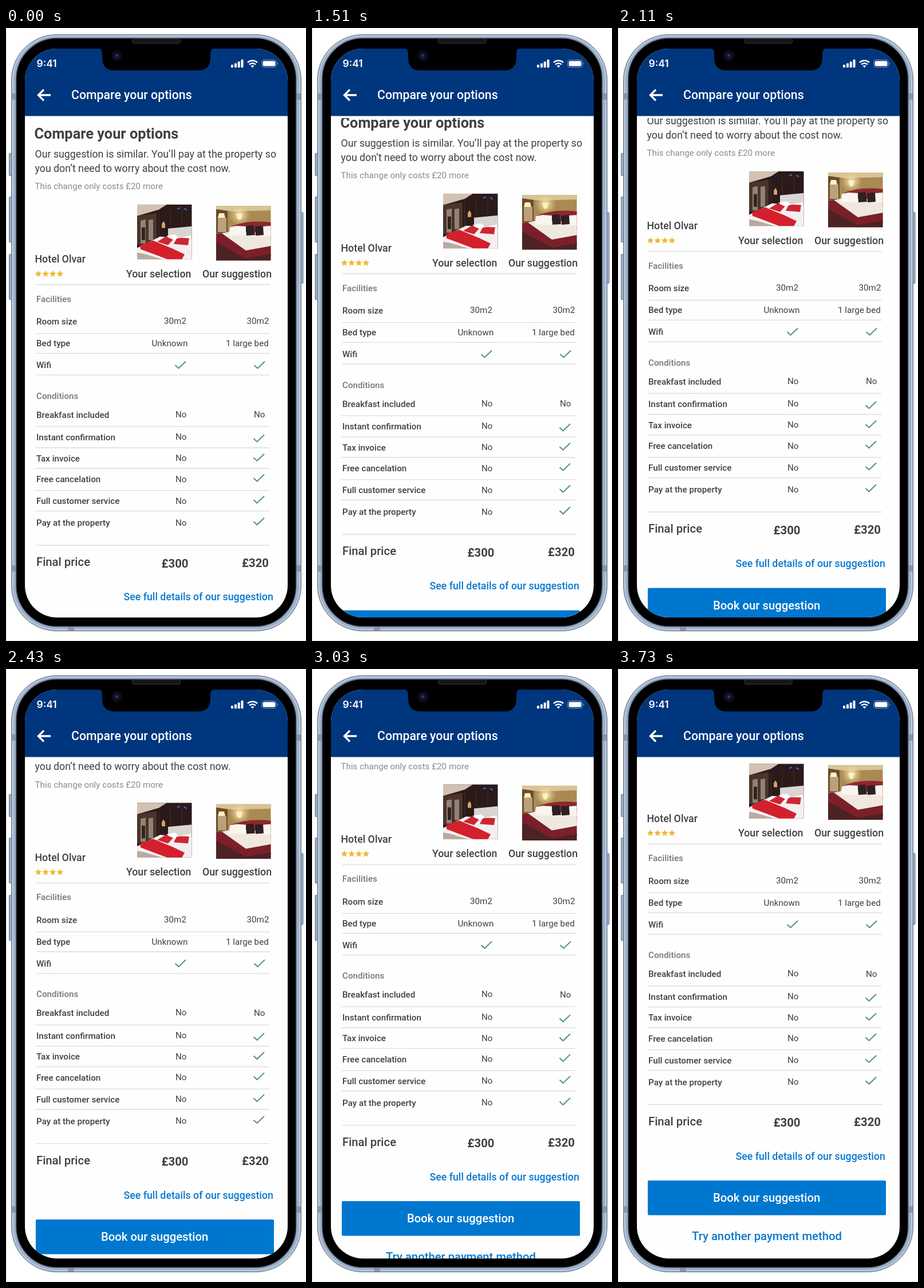
These frames come from a looping animation (524x1069 px, 6.55 s). An HTML page:

```html
<!DOCTYPE html>
<html lang="en">
<head>
<meta charset="utf-8">
<title>Compare your options</title>
<style>
  html, body { margin: 0; width: 100%; height: 100%; overflow: hidden; background: #fff; }
  svg { display: block; font-family: Roboto, sans-serif; }
  .medium { font-weight: 500; }
  .bold { font-weight: 700; }
  .line { stroke: #dcdcdc; stroke-width: 1.3; }
  .check { fill: none; stroke: #529568; stroke-width: 2; }
</style>
</head>
<body>
<svg width="524" height="1069" viewBox="0 0 524 1069">
  <defs>
    <clipPath id="view"><path d="M33 157H492V972a56 56 0 0 1-56 56H89a56 56 0 0 1-56-56Z"/></clipPath>
    <clipPath id="screen"><rect x="33" y="36" width="459" height="992" rx="56"/></clipPath>
    <clipPath id="square"><rect width="95.5" height="95.5"/></clipPath>
    <radialGradient id="glow">
      <stop offset="0" stop-color="#fff6cf"/>
      <stop offset="1" stop-color="#e3c37a" stop-opacity="0"/>
    </radialGradient>
  </defs>

  <path d="M.5 0V1068.5H524" fill="none" stroke="#e6e6e6"/>

  <!-- Phone body -->
  <g fill="#9dafc6" stroke="#66758c">
    <rect x="5.5" y="218.5" width="6" height="39" rx="1.5"/>
    <rect x="5.5" y="294.5" width="6" height="79" rx="1.5"/>
    <rect x="5.5" y="394.5" width="6" height="79" rx="1.5"/>
    <rect x="512.5" y="321.5" width="6.5" height="124" rx="1.5"/>
    <rect x="9.5" y="11.5" width="506" height="1040" rx="79"/>
  </g>
  <rect x="12" y="14" width="501" height="1035" rx="76" fill="none" stroke="#bccbdd" stroke-width="2"/>
  <path d="M9.5 114h9v11h-9zm0 823h9v11h-9zM506 114h9v11h-9zm0 823h9v11h-9zM108 1042h11v9h-11z" fill="#8795a9"/>
  <rect x="18" y="18" width="488.5" height="1025.5" rx="71" stroke="#38435a" stroke-width="1.5"/>
  <rect x="220.5" y="18.5" width="84" height="8" rx="3" fill="#151515" stroke="#3a3a3a"/>

  <g clip-path="url(#screen)">
    <rect x="33" y="36" width="459" height="992" fill="#fefefe"/>
    <rect x="33" y="36" width="459" height="117.5" fill="#00367d"/>
  </g>
  <path d="M160 35q8 1 8 9v8q0 22 22 22H335q22 0 22-22V44q0-8 8-9Z"/>
  <circle cx="193.5" cy="48.5" r="10" fill="#0b0c12"/>
  <circle cx="193.5" cy="48.5" r="5" fill="#131a42"/>
  <circle cx="193.5" cy="48" r="1.7" fill="#34468c"/>

  <!-- Status bar and title -->
  <g fill="#fff">
    <text x="53.5" y="68" font-size="17.5" font-weight="600" font-family="Inter, sans-serif">9:41</text>
    <rect x="393" y="64" width="4" height="5" rx="1"/>
    <rect x="399" y="61.5" width="4" height="7.5" rx="1"/>
    <rect x="404.7" y="58.5" width="4" height="10.5" rx="1"/>
    <rect x="410.5" y="55" width="4" height="14" rx="1"/>
    <path d="M427.5 66l3 3.2 3-3.2q-3-2.2-6 0Z"/>
    <path d="M422 60.2a12.5 12.5 0 0 1 17 0M425 63.7a8 8 0 0 1 11 0" fill="none" stroke="#fff" stroke-width="2.5"/>
    <rect x="446.5" y="55.5" width="26" height="13" rx="4" fill="none" stroke="#fff" stroke-opacity=".45"/>
    <rect x="448.5" y="57.5" width="22" height="9" rx="2.5"/>
    <path d="M474 60q2 2 0 4.5Z" opacity=".5"/>
    <path d="M78 117H57M66 107.5l-9.5 9.5 9.5 9.5" fill="none" stroke="#fff" stroke-width="3.3"/>
    <text x="114" y="124.3" font-size="21.3" class="medium">Compare your options</text>
  </g>

  <g clip-path="url(#view)"><g id="page">
    <g transform="translate(229 307.7)" clip-path="url(#square)">
      <path d="M0 0H96V96H0Z" fill="#2a1a1a"/>
      <path d="M0 0H52L38 9 0 20Z" fill="#d3c2b2"/>
      <path d="M0 20L34 15V70H0Z" fill="#4c3429"/>
      <path d="M6 28l9-2v42H6ZM20 27l8-1v36h-8Z" fill="#8f8379"/>
      <path d="M8 40h6v22H8Z" fill="#33231f"/>
      <path d="M38 14V60M58 10V40M78 8V38" stroke="#46302c"/>
      <path d="M43 34l3-5 3 5v7h-6Z" fill="#d8a263"/>
      <path d="M70 8l5-2M82 7l5 3" stroke="#3c68d8" stroke-width="2"/>
      <path d="M54 42L96 38V66H54Z" fill="#d9d5d2"/>
      <path d="M0 76L40 56 96 60V96H0Z" fill="#f3eff0"/>
      <path d="M0 84l12 2 34 10H0Z" fill="#b9aaa0"/>
      <path d="M5 71L28 63 62 77 83 87 78 96H54L6 78Z" fill="#d3202c"/>
      <path d="M35 65l15-9 13 5-9 10ZM64 69l5-10 22-2-2 14Z" fill="#cf2532"/>
      <path d="M51 55l15-3 7 6-9 4ZM74 58l20-4v5Z" fill="#fff"/>
    </g>
    <g transform="translate(367 310)" clip-path="url(#square)">
      <path d="M0 0H96V96H0Z" fill="#a98a52"/>
      <path d="M0 0H96V8L30 10 0 6Z" fill="#d8c296"/>
      <path d="M0 6L20 9V48H0Z" fill="#6c4a2c"/>
      <path d="M3 21h15V46H3Z" fill="#bba17b"/>
      <circle cx="41" cy="16" r="19" fill="url(#glow)"/>
      <path d="M35 14h11l-3 10h-5ZM5 13h9l2 8H3Z" fill="#fff1bd"/>
      <path d="M24 37Q55 24 96 29V60H24Z" fill="#8d2630"/>
      <path d="M0 50L30 44 96 48V96H0Z" fill="#efe8df"/>
      <path d="M24 37l12-2 16 1v16H22ZM82 36l14-1v18H80Z" fill="#f8f4ee"/>
      <path d="M52 35l13-1 3 17-15 1ZM68 36l14-1 1 16-14 1Z" fill="#2c2022"/>
      <path d="M0 49L10 48 52 78 96 70V88L52 96 0 66Z" fill="#7b1f2b"/>
      <path d="M0 64L52 92 96 84V96H0Z" fill="#4d2224"/>
    </g>
  </g></g>
</svg>
<script>
const INK = '#404040', GREY = '#8b8b8b', LINK = '#0b79cf';
const SMALL = 15.2, BODY = 17.75, LARGE = 20.28, HEADING = 25.35;
const page = document.getElementById('page');

function add(tag, attrs, content = '') {
  const node = document.createElementNS('http://www.w3.org/2000/svg', tag);
  for (const name in attrs) node.setAttribute(name, attrs[name]);
  node.textContent = content;
  page.append(node);
}

const text = (content, x, y, size, weight = '', fill = INK) =>
  add('text', { x, y, 'font-size': size, class: weight, fill }, content);
const line = (y, x = 53, end = 461) => add('path', { d: `M${x} ${y}H${end}`, class: 'line' });
const check = (x, y) => add('path', { d: `M${x - 9.5} ${y + .5}l6 5.5 12.5-12`, class: 'check' });

function star(cx, cy) {
  const points = Array.from({ length: 10 }, (_, i) => {
    const angle = i * Math.PI / 5, radius = i % 2 ? 2.8 : 6.2;
    return [cx + radius * Math.sin(angle), cy - radius * Math.cos(angle)];
  });
  add('polygon', { points: points.join(' '), fill: '#f0b832' });
}

text('Compare your options', 49.5, 192.5, HEADING, 'bold');
text('Our suggestion is similar. You’ll pay at the property so', 50.5, 225.5, BODY);
text('you don’t need to worry about the cost now.', 50.5, 250.8, BODY);
text('This change only costs £20 more', 50.5, 281.2, SMALL, '', GREY);

text('Hotel Olvar', 50.5, 409.3, BODY, 'medium');
for (let i = 0; i < 4; i++) star(56.5 + i * 12.6, 428.8);
text('Your selection', 210, 434.7, BODY, 'medium');
text('Our suggestion', 343, 434.7, BODY, 'medium');
line(447.5);

text('Facilities', 53, 477.7, SMALL, 'medium', '#777');
text('Conditions', 53, 646.7, SMALL, 'medium', '#777');

const rows = [
  ['Room size', 517], ['Bed type', 555.2], ['Wifi', 593], ['Breakfast included', 679.5],
  ['Instant confirmation', 719], ['Tax invoice', 755.6], ['Free cancelation', 792.4],
  ['Full customer service', 830.4], ['Pay at the property', 868.4],
];
rows.forEach(([label, y], i) => {
  text(label, 53, y, SMALL, 'medium');
  if (i > 2) text('No', 296, y - .6, SMALL);
});
text('30m2', 276, 516, SMALL);
text('30m2', 420.5, 516, SMALL);
text('Unknown', 254.5, 555.2, SMALL);
text('1 large bed', 384, 555.2, SMALL);
text('No', 433, 679.3, SMALL);

check(305, 587.5);
check(443, 587.5);
[715.5, 748.7, 784.5, 822.5, 860.3].forEach(y => check(442, y));
[532.7, 567.4, 605.2, 902].forEach(y => line(y));
[695.2, 732, 768, 806.7, 842.4].forEach(y => line(y, 51, 460));

text('Final price', 53, 938.3, LARGE, 'medium');
text('£300', 271.5, 940.8, LARGE, 'bold');
text('£320', 412, 939.6, LARGE, 'bold');
text('See full details of our suggestion', 205.5, 998, BODY, 'medium', LINK);
add('rect', { x: 52, y: 1034.5, width: 416, height: 60.5, rx: 2, fill: '#0077cf' });
text('Book our suggestion', 166, 1071.5, LARGE, 'medium', '#fff');
text('Try another payment method', 129, 1138.3, LARGE, 'medium', LINK);

// Scroll distance by step; the page advances once every 100 ms.
const LOOP = 6550, START = 1310, STEP = 100;
const scrollKeys = [[0, 2.3], [2, 19], [4, 34.2], [6, 46.7], [8, 58], [14, 90.8], [20, 122], [24, 142.5]];

function scrollAt(time) {
  if (time < START) return 0;
  const pause = time >= 2610 ? 20 : 0;
  const step = Math.min(24, Math.floor((time - START - pause) / STEP));
  const next = Math.max(1, scrollKeys.findIndex(([key]) => key >= step));
  const [[k0, y0], [k1, y1]] = [scrollKeys[next - 1], scrollKeys[next]];
  return y0 + (y1 - y0) * (step - k0) / (k1 - k0);
}

function frame() {
  page.setAttribute('transform', `translate(0 ${-scrollAt(performance.now() % LOOP)})`);
  requestAnimationFrame(frame);
}
frame();
</script>
</body>
</html>
```
